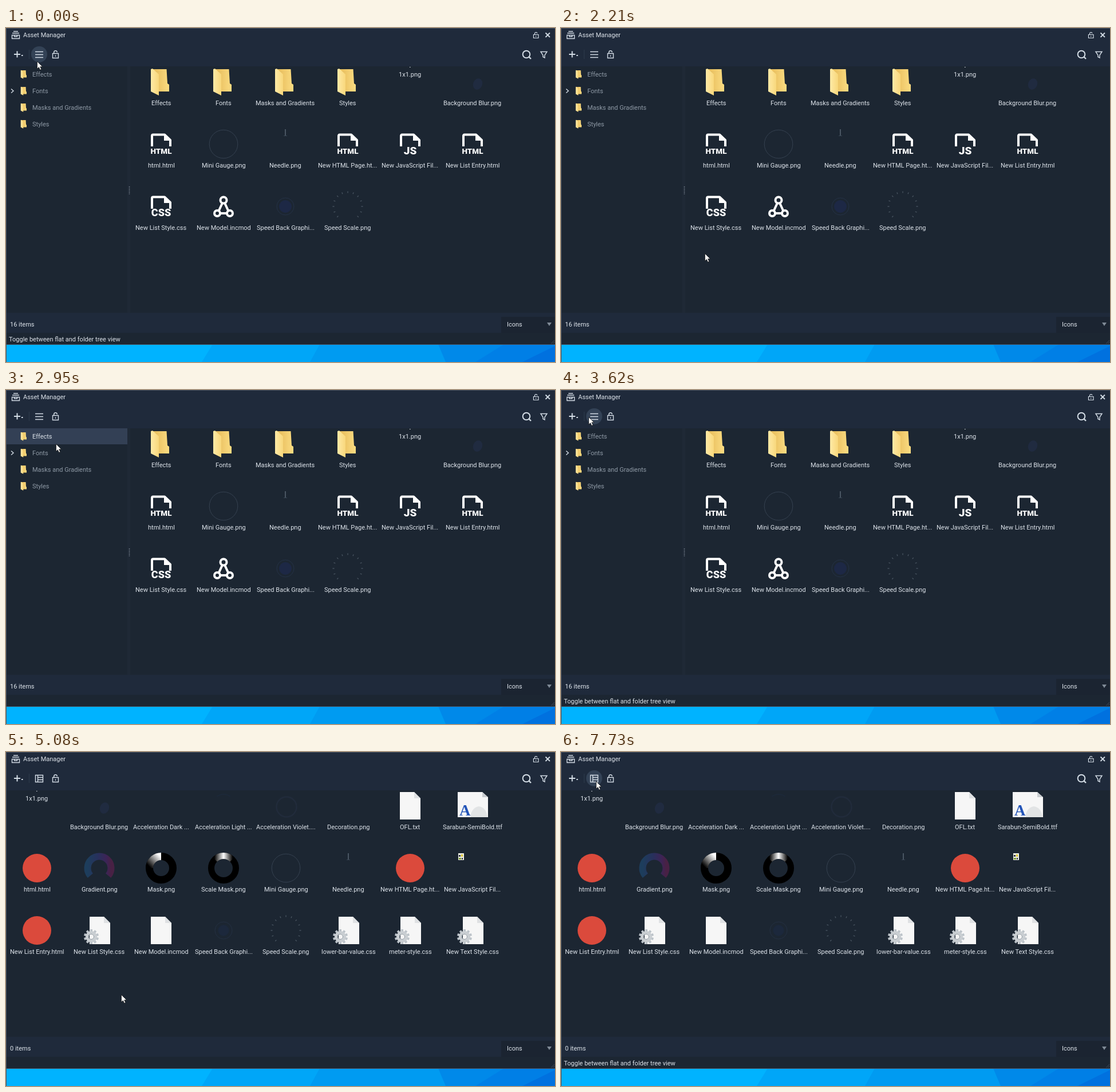
An HTML page for the animation above (8000 ms loop, 959 px wide and 584 px high).

```html
<!DOCTYPE html>
<html lang="en">
<head>
<meta charset="utf-8">
<title>Asset Manager</title>
<style>
  html, body { margin: 0; width: 100%; height: 100%; overflow: hidden; background: #1c2632; }
  svg { display: block; width: 959px; height: 584px; }
  text { font: 11px Roboto, sans-serif; fill: #dde3ea; }
  .tree text { fill: #8f9aa6; }
  .tree .on text { fill: #dde3ea; }
  .row { fill: none; }
  .on .row { fill: #334055; }
  .line { fill: none; stroke: #d3dce5; stroke-width: 1.4; }
  .bold { fill: none; stroke: #fff; stroke-width: 4; stroke-linejoin: round; }
  text.tag { font-weight: 900; fill: #fff; text-anchor: middle; }
</style>
</head>
<body>
<svg id="stage" viewBox="0 0 959 584">
  <defs>
    <linearGradient id="flap" x2="1"><stop stop-color="#ffeaa6"/><stop offset="1" stop-color="#f8d77b"/></linearGradient>
    <linearGradient id="back" x2="1"><stop stop-color="#e5b957"/><stop offset="1" stop-color="#fbdc82"/></linearGradient>
    <linearGradient id="hue" x2="1"><stop stop-color="#1d3d5c"/><stop offset=".45" stop-color="#28305c"/><stop offset=".8" stop-color="#3c2456"/><stop offset="1" stop-color="#482144"/></linearGradient>
    <linearGradient id="quarter" gradientUnits="userSpaceOnUse" x1="-20" y1="-2" x2="-1" y2="-20"><stop/><stop offset="1" stop-color="#fff"/></linearGradient>
    <linearGradient id="peak" gradientUnits="userSpaceOnUse" x1="-16" x2="16"><stop/><stop offset=".5" stop-color="#fff"/><stop offset="1"/></linearGradient>
    <g id="folder">
      <path d="M-15-22H9.500L11 3L14 5V17H-5Z" fill="url(#back)"/>
      <path d="M-18-22L-15-23L-4-13V24L-18 17Z" fill="url(#flap)"/>
    </g>
    <path id="sheet" d="M-18-24H7L18-13V24H-18Z" fill="#f6f6f6"/>
    <path id="fold" d="M7-24V-13H18Z" fill="#dfe1e3"/>
  </defs>

  <rect width="959" height="553" fill="#1c2632"/>
  <path d="M0 0H959V67H0ZM0 498H959V533H0Z" fill="#1f2a3b"/>
  <rect x="865" y="505" width="94" height="28" fill="#1b2431"/>

  <g id="desktop">
    <rect y="553" width="959" height="31" fill="#00b3ff"/>
    <path d="M361 553H959V584H342Z" fill="#00a6f8"/>
    <path d="M548 553H959V584H531Z" fill="#009bf1"/>
    <path d="M755 553H959V584H768Z" fill="#0089e9"/>
    <path d="M870 553H959V584H820Z" fill="#007fe6"/>
    <path d="M959 556V584H902Z" fill="#0071df"/>
  </g>
  <path d="M959 .5H.5V584M0 553.500H959" fill="none" stroke="#485160"/>

  <g class="line">
    <path d="M10.500 12.500H23.500V18.500H10.500ZM11 9H23M13 6H21M14.500 13V15H19.500V13"/>
    <path d="M14 46H25M19.500 40.500V51.500" stroke-width="2"/>
    <path d="M27 48H29.500" stroke-width="2"/>
    <path d="M40.500 38V54" stroke="#2b3748"/>
    <path d="M921.500 11.500H930V17.500H921.500ZM923.500 11V9.500A2.300 2.300 0 0 1 928 9.500M925.700 13.500V15.500" stroke-width="1.200"/>
    <path d="M942.500 8.500L950 16M950 8.500L942.500 16" stroke-width="1.800"/>
    <circle cx="909" cy="46" r="6.300" stroke-width="2"/>
    <path d="M913.500 50.500L917 54" stroke-width="2.400"/>
    <path d="M934 41.500H945L941 47.500V52L938 50.500V47.500Z"/>
    <path d="M952 552L958 546M955 552L958 549" stroke="#3d4959" stroke-width="1"/>
  </g>
  <circle id="hover" cx="58" cy="46" r="14" fill="#334256"/>
  <path class="line" d="M81.500 44.500H91.500V52.500H81.500ZM83.700 44V42.500A2.800 2.800 0 0 1 89.300 42.500M86.500 47.500V50"/>
  <path class="line" id="menu"/>
  <path d="M945 515H953L949 521Z" fill="#7f8a96"/>

  <text x="30" y="16">Asset Manager</text>
  <text x="7" y="522" id="count"></text>
  <text x="875" y="522">Icons</text>
  <text x="5" y="548" id="tip">Toggle between flat and folder tree view</text>

  <g id="nested"></g>
  <g id="flat"></g>
  <path id="cursor" d="M.500.500V13.300L3.400 10.600L5.600 15.300L7.800 14.300L5.700 9.700H9.700Z" fill="#fff" stroke="#111" stroke-width=".7"/>
</svg>

<script>
const $ = id => document.getElementById(id);
const LOOP = 8000, SWITCH = 3910, PITCH = 108.7;

// time, pointer x, pointer y
const path = [
  [0, 54, 58], [1080, 80, 100], [1200, 210, 270], [1320, 303, 394],
  [1600, 298, 397], [1720, 290, 400], [1840, 278, 403], [1960, 267, 404],
  [2210, 251, 394], [2330, 216, 345], [2450, 172, 279],
  [2590, 146, 222], [2710, 120, 166], [2830, 102, 122], [2950, 87, 94],
  [3100, 78, 73], [3250, 59, 56], [3370, 48, 47],
  [4540, 91, 140], [4690, 150, 260], [4820, 201, 361], [4960, 115, 284],
  [5080, 201, 424], [7030, 159, 386], [7150, 115, 305], [7270, 127, 236],
  [7420, 116, 181], [7570, 76, 79], [7730, 61, 51]
];

const shape = (d, attrs) => `<path d="${d}" ${attrs}/>`;
const ring = (r, color, width = 1, fill = 'none') =>
  `<circle r="${r}" fill="${fill}" stroke="${color}" stroke-width="${width}"/>`;
const arc = (r, from, to) => {
  const at = a => [r * Math.cos(a * Math.PI / 180), r * Math.sin(a * Math.PI / 180)].map(n => n.toFixed(2));
  return `M${at(from)}A${r} ${r} 0 ${+(to - from > 180)} 1 ${at(to)}`;
};
const code = (tag, size, y) =>
  shape('M-16 4V-14Q-16-16.500-14-16.500H6L16-7V4', 'class="bold"') +
  shape('M5-17V-6H17Z', 'fill="#fff"') +
  `<text class="tag" y="${y}" style="font-size:${size}px">${tag}</text>`;
const ticks = () => Array.from({ length: 13 }, (_, i) =>
  `<path d="M23.500 0H26.500" transform="rotate(${135 + i * 22.5})" stroke="#4b5763" stroke-width="1.300"/>`).join('');
const sheet = '<use href="#sheet"/><use href="#fold"/>';
const gear = Array.from({ length: 10 }, (_, i) =>
  `<rect x="-2" y="-13" width="4" height="6" fill="#bcc3c9" transform="rotate(${i * 36})"/>`).join('') +
  ring(7.5, '#c9ced2', 5) + ring(4.5, '#8d979f', 1);

const icons = {
  folder: '<use href="#folder"/>',
  dot: '<rect x="-1" y="-26" width="1.500" height="1" fill="#e6ebf0"/>',
  blur: '<ellipse cx="9" cy="4" rx="8" ry="10" fill="#202b40" transform="rotate(20 9 4)"/>',
  html: code('HTML', 13.5, 17),
  js: code('JS', 19, 18),
  css: code('CSS', 18, 17),
  gauge: ring(24.8, '#354150'),
  needle: shape('M0-26V-15', 'stroke="#64717f" stroke-width="1.300"') + shape('M-3-14.500H3', 'stroke="#384553"'),
  model: '<g class="bold">' + shape('M-2.500-5L-8 7M2.500-5L8 7M-5 12H5', '') +
    '<circle cy="-11" r="5.500"/><circle cx="-11" cy="12" r="5"/><circle cx="11" cy="12" r="5"/></g>',
  dial: ring(15, '#253246') + ring(10.5, '#1d2945', 1, '#1d2845'),
  dial2: ring(15, '#243042') + ring(9, '#1c293e', 1, '#1c283c'),
  scale: ticks(),
  page: '<circle r="25" fill="#db4a3c"/>',
  none: '',
  faint: shape(arc(20, 235, 305), 'fill="none" stroke="#1d2939" stroke-width="2"'),
  violet: `<g transform="translate(1 2)">${ring(17.5, '#212b3b', 2.5)}</g>`,
  sheet,
  style: `<g transform="translate(1 0)">${sheet}</g><g transform="translate(-14 11)">${gear}</g>`,
  font: shape('M-26-24H17L27-15V20H-26Z', 'fill="#f6f6f6"') +
    shape('M-3 20A17 17 0 0 1 11 1Q24 3 26 20Z', 'fill="#e2e4e5"') +
    shape('M17-24V-15H27Z', 'fill="#c9cdd0"') +
    '<text x="-23" y="17" style="font:bold 27px \'Liberation Serif\',serif;fill:#2455b8">A</text>',
  hue: shape(arc(20.5, 140, 400), 'fill="none" stroke="url(#hue)" stroke-width="12"'),
  mask: ring(20.5, '#000', 13) + shape(arc(20.5, 180, 270), 'fill="none" stroke="url(#quarter)" stroke-width="13"'),
  mask2: ring(21.5, '#000', 11) + shape(arc(21.5, 225, 315), 'fill="none" stroke="url(#peak)" stroke-width="11"'),
  script: '<rect x="-25" y="-26" width="10" height="12" fill="#eef0e4"/>' +
    shape('M-24-23H-21V-20H-24ZM-19-18H-17V-15H-19Z', 'fill="#334"') +
    shape('M-20-24H-17V-20H-20Z', 'fill="#d9c233"') + shape('M-24-18H-20V-15H-24Z', 'fill="#7d9b35"')
};

// "icon|label" entries, laid out left to right on whole pixels
const grid = (list, left, columns) => list.map((entry, i) => {
  const [icon, label] = entry.split('|');
  const x = Math.round(left + i % columns * PITCH), y = 94 + Math.floor(i / columns) * 109;
  return `<g transform="translate(${x} ${y})">${icons[icon]}` +
    `<text class="label" y="${icon === 'dot' ? -9 : 41}">${label}</text></g>`;
}).join('');

const tree = ['Effects', 'Fonts', 'Masks and Gradients', 'Styles'].map((name, i) =>
  `<g><rect class="row" x="1" y="${67 + i * 29}" width="211" height="28"/>` +
  `<use href="#folder" transform="translate(31.500 ${81 + i * 29}) scale(.32)"/>` +
  `<text x="46" y="${85 + i * 29}">${name}</text></g>`).join('');

$('nested').innerHTML =
  '<rect x="212" y="67" width="5" height="431" fill="#1f2936"/>' +
  shape('M215.500 277V291', 'stroke="#8b96a2" stroke-width="1.500" stroke-dasharray="1 1.500"') +
  `<g class="tree">${tree}</g>` +
  shape('M9 106.500L13 110L9 113.500', 'class="line"') +
  grid([
    'folder|Effects', 'folder|Fonts', 'folder|Masks and Gradients', 'folder|Styles', 'dot|1x1.png', 'blur|Background Blur.png',
    'html|html.html', 'gauge|Mini Gauge.png', 'needle|Needle.png', 'html|New HTML Page.ht...', 'js|New JavaScript Fil...', 'html|New List Entry.html',
    'css|New List Style.css', 'model|New Model.incmod', 'dial|Speed Back Graphi...', 'scale|Speed Scale.png'
  ], 271, 6);

$('flat').innerHTML = grid([
  'dot|1x1.png', 'blur|Background Blur.png', 'none|Acceleration Dark ...', 'faint|Acceleration Light ...',
  'violet|Acceleration Violet....', 'none|Decoration.png', 'sheet|OFL.txt', 'font|Sarabun-SemiBold.ttf',
  'page|html.html', 'hue|Gradient.png', 'mask|Mask.png', 'mask2|Scale Mask.png',
  'gauge|Mini Gauge.png', 'needle|Needle.png', 'page|New HTML Page.ht...', 'script|New JavaScript Fil...',
  'page|New List Entry.html', 'style|New List Style.css', 'sheet|New Model.incmod', 'dial2|Speed Back Graphi...',
  'scale|Speed Scale.png', 'style|lower-bar-value.css', 'style|meter-style.css', 'style|New Text Style.css'
], 54, 8);

// centre labels, starting each on a whole pixel
for (const label of document.querySelectorAll('.label'))
  label.setAttribute('x', -Math.round(label.getComputedTextLength() / 2));

const rows = [...document.querySelectorAll('.tree > g')];
const show = (el, on) => el.setAttribute('visibility', on ? 'visible' : 'hidden');

function render(t) {
  const [, x, y] = path.findLast(step => step[0] <= t);
  const nested = t < SWITCH;
  const onButton = Math.hypot(x - 58, y - 46) <= 14;
  const row = nested && x < 212 ? Math.floor((y - 67) / 29) : -1;

  $('cursor').setAttribute('transform', `translate(${x} ${y})`);
  $('nested').style.display = nested ? '' : 'none';
  $('flat').style.display = nested ? 'none' : '';
  $('count').textContent = nested ? '16 items' : '0 items';
  $('menu').setAttribute('d', nested
    ? 'M51 41.500H65M51 46.500H65M51 51.500H65'
    : 'M51.500 40.500H64.500V52.500H51.500ZM55.500 40.500V52.500M55.500 44.500H64.500M55.500 48.500H64.500');
  show($('hover'), onButton);
  show($('tip'), onButton);
  rows.forEach((el, i) => el.classList.toggle('on', i === row));
}

const start = performance.now();
function tick() {
  render((performance.now() - start) % LOOP);
  requestAnimationFrame(tick);
}
tick();
</script>
</body>
</html>
```
